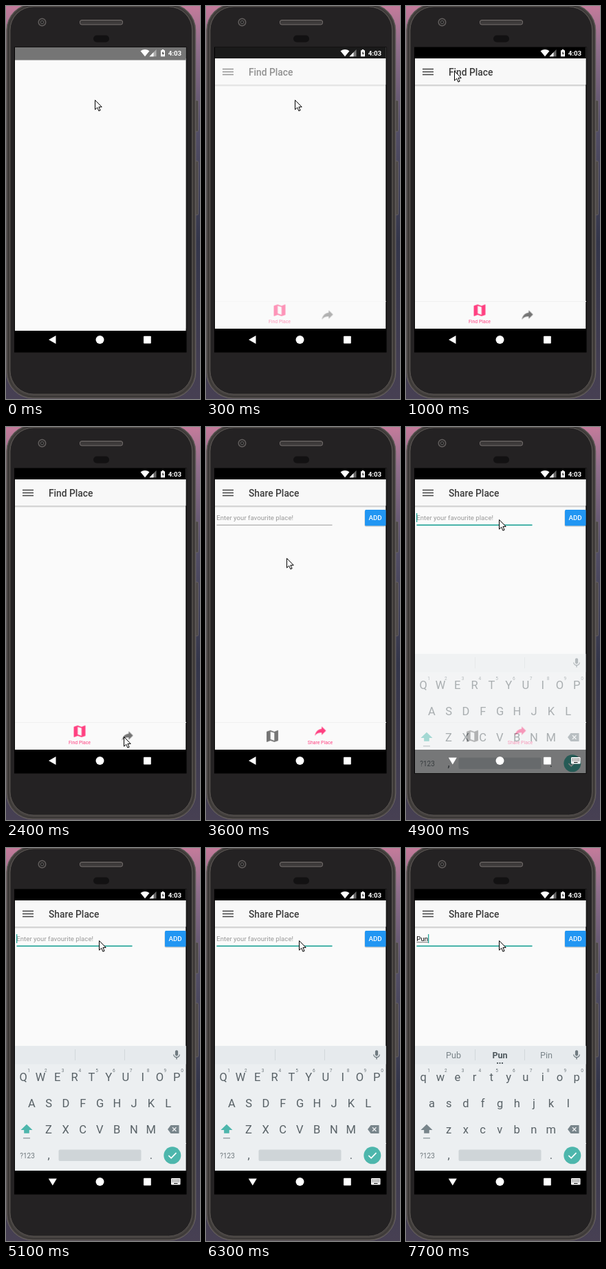
An HTML page for the animation above (8 s loop, 282x570 px).

```html
<!DOCTYPE html>
<html lang="en">
<head>
<meta charset="utf-8">
<title>Share a place</title>
<style>
html, body { margin: 0; width: 100%; height: 100%; overflow: hidden; background: #242223; }
svg { display: block; width: 282px; height: 570px; }
text { font-family: Roboto, sans-serif; }
.mid { text-anchor: middle; }
.title { font-size: 13.8px; font-weight: 500; fill: #3c3c3c; }
.field { font-size: 9.66px; }
.label { font-size: 6.9px; fill: #ff4081; }
.key { font-size: 16.5px; fill: #596267; }
.hint { font-size: 6.5px; fill: #6f787d; }
.word { font-size: 12.6px; fill: #7b858a; }
.word.best { font-weight: 700; fill: #4f595e; }
.teal { fill: #26a69a; }

/* One clock for every part: 1.25% is 100 ms */
.a { animation: 8s step-end infinite; }
#status { animation-name: status; }
#splash { animation-name: splash; }
#app { animation-name: app; }
#find { animation-name: till3000; }
#share { animation-name: from3000; }
.idle { animation-name: till4800; }
.focus { animation-name: from4800; }
#mapTab { animation-name: mapTab; }
#shareTab { animation-name: shareTab; }
#mapLabel { animation-name: fadeOut; }
#shareLabel { animation-name: fadeIn; }
#keyboard { animation-name: keyboard; }
#hint { animation-name: till6800; }
#caret { animation-name: blink; }
#caps { animation-name: till6900; }
#lower { animation-name: from6900; }
#type1 { animation-name: type1; }
#type2 { animation-name: type2; }
#type3 { animation-name: type3; }
#words1 { animation-name: words1; }
#words2 { animation-name: words2; }
#words3 { animation-name: words3; }
#cursor { animation-name: cursor; }

@keyframes status {
  0% { fill: #757575; }
  1.25% { fill: #3a3a3a; }
  3.75% { fill: #1a1a1a; }
  5%, to { fill: #000; }
}
@keyframes splash { 1.25%, to { opacity: 0; } }
@keyframes app { 0% { opacity: 0; } 3.75% { opacity: .55; } 5%, to { opacity: 1; } }
@keyframes till3000 { 37.5%, to { opacity: 0; } }
@keyframes from3000 { 0% { opacity: 0; } 37.5%, to { opacity: 1; } }
@keyframes till4800 { 60%, to { opacity: 0; } }
@keyframes from4800 { 0% { opacity: 0; } 60%, to { opacity: 1; } }
@keyframes till6800 { 85%, to { opacity: 0; } }
@keyframes till6900 { 86.25%, to { opacity: 0; } }
@keyframes from6900 { 0% { opacity: 0; } 86.25%, to { opacity: 1; } }
@keyframes type1 { 0% { opacity: 0; } 85% { opacity: 1; } 91.25%, to { opacity: 0; } }
@keyframes type2 { 0% { opacity: 0; } 91.25% { opacity: 1; } 95%, to { opacity: 0; } }
@keyframes type3 { 0% { opacity: 0; } 95%, to { opacity: 1; } }
@keyframes words1 { 0% { opacity: 0; } 86.25% { opacity: 1; } 92.5%, to { opacity: 0; } }
@keyframes words2 { 0% { opacity: 0; } 92.5% { opacity: 1; } 96.25%, to { opacity: 0; } }
@keyframes words3 { 0% { opacity: 0; } 96.25%, to { opacity: 1; } }
@keyframes blink {
  0% { opacity: 0; }
  60% { opacity: 1; }
  66.25% { opacity: 0; }
  72.5% { opacity: 1; }
  78.75%, to { opacity: 0; }
}
@keyframes fadeOut {
  0% { opacity: 1; }
  35% { opacity: 1; animation-timing-function: steps(3); }
  38.75%, to { opacity: 0; }
}
@keyframes fadeIn {
  0% { opacity: 0; }
  35% { opacity: 0; animation-timing-function: steps(3); }
  38.75%, to { opacity: 1; }
}
@keyframes mapTab {
  0% { transform: translate(107px, 441.3px); fill: #ff4081; }
  35% { transform: translate(107px, 441.3px); fill: #ff4081; animation-timing-function: steps(3); }
  38.75%, to { transform: translate(96.5px, 448.3px); fill: #757575; }
}
@keyframes shareTab {
  0% { transform: translate(176.5px, 448px); fill: #757575; }
  35% { transform: translate(176.5px, 448px); fill: #757575; animation-timing-function: steps(3); }
  38.75%, to { transform: translate(166.3px, 441px); fill: #ff4081; }
}
@keyframes keyboard {
  0% { transform: translateY(70px); opacity: 0; }
  60% { transform: translateY(70px); opacity: .12; }
  61.25% { transform: translateY(42px); opacity: .5; }
  62.5% { transform: translateY(13px); opacity: .85; }
  63.75%, to { transform: none; opacity: 1; }
}
@keyframes cursor {
  0% { transform: translate(129px, 136px); }
  6.25% { transform: translate(129px, 136px); animation-timing-function: steps(3); }
  10% { transform: translate(22px, 95px); animation-timing-function: steps(2); }
  12.5% { transform: translate(70px, 94px); animation-timing-function: steps(4); }
  17.5% { transform: translate(110px, 285px); animation-timing-function: steps(3); }
  21.25% { transform: translate(97px, 297px); }
  22.5% { transform: translate(97px, 297px); animation-timing-function: steps(6); }
  30% { transform: translate(171px, 449px); }
  38.75% { transform: translate(171px, 449px); animation-timing-function: steps(5); }
  45% { transform: translate(117px, 190px); }
  46.25% { transform: translate(117px, 175px); animation-timing-function: steps(5); }
  52.5%, to { transform: translate(135px, 134px); }
}
</style>
</head>
<body>
<svg viewBox="0 0 282 570">
  <defs>
    <linearGradient id="sky" x2="0" y2="1">
      <stop offset="0" stop-color="#c47b9b"/>
      <stop offset=".1" stop-color="#92708d"/>
      <stop offset=".3" stop-color="#555068"/>
      <stop offset=".6" stop-color="#34364a"/>
      <stop offset="1" stop-color="#474053"/>
    </linearGradient>
    <linearGradient id="shade" x2="0" y2="1">
      <stop offset="0" stop-opacity=".26"/>
      <stop offset="1" stop-opacity="0"/>
    </linearGradient>
    <clipPath id="screen"><rect x="13" y="60" width="248.5" height="441.5"/></clipPath>
    <path id="map" d="M20.5 3l-.16.03L15 5.1 9 3 3.36 4.9c-.21.07-.36.25-.36.48V20.5c0 .28.22.5.5.5l.16-.03L9 18.9l6 2.1 5.64-1.9c.21-.07.36-.25.36-.48V3.5c0-.28-.22-.5-.5-.5zM15 19l-6-2.11V5l6 2.11V19z"/>
    <path id="arrow" d="M14 5v4C7 10 4 15 3 20c2.5-3.5 6-5.1 11-5.1V19l7-7z"/>
    <path id="shift" d="M30 400.800l8.500 8.200h-4.700v4.700h-7.600v-4.700h-4.700z"/>
  </defs>

  <!-- Phone -->
  <rect width="282" height="570" fill="url(#sky)"/>
  <rect x="274" y="137" width="5.500" height="45" rx="1.500" fill="#4b4746" stroke="#77716f" stroke-width=".6"/>
  <rect x="274" y="225" width="5.500" height="78" rx="1.500" fill="#4b4746" stroke="#77716f" stroke-width=".6"/>
  <rect x=".8" y="-3" width="275" height="572" rx="38" fill="#464240" stroke="#6d6764"/>
  <rect x="3.500" y="-.5" width="269.500" height="567" rx="36" fill="none" stroke="#343130"/>
  <rect x="6" y="1" width="264.500" height="562" rx="34" fill="#242223" stroke="#625d5a" stroke-width=".8"/>
  <rect x="107.500" y="20.500" width="62" height="6.500" rx="2.500" fill="#3d3a3a" stroke="#77716f"/>
  <circle cx="52.500" cy="23.500" r="5.300" fill="#2c2a2a" stroke="#625e5d" stroke-width="1.400"/>
  <circle cx="52.500" cy="23.500" r="2" fill="#171616" stroke="#777" stroke-width=".8"/>
  <rect x="127" y="42.500" width="23" height="10" rx="5" fill="#121112"/>
  <rect x="12" y="59.500" width="250.500" height="443" fill="#000"/>

  <g clip-path="url(#screen)">
    <rect x="13" y="60" width="248.500" height="408" fill="#fafafa"/>
    <rect id="status" class="a" x="13" y="60" width="248.500" height="16" fill="#000"/>
    <g id="splash" class="a">
      <rect x="13" y="76" width="248.500" height="395" fill="#fafafa"/>
      <rect x="13" y="60" width="248.500" height="18.500" fill="#757575"/>
    </g>

    <g fill="#fff">
      <path d="M195.500 65.300q6.500-4.600 13 0l-6.500 8z"/>
      <path d="M218.500 63v10.200h-10z" opacity=".4"/>
      <path d="M214.500 67v6.200h-6z"/>
      <path d="M225 64.200h1.800v-1.200h2.400v1.200h1.800v9h-6z"/>
      <path d="M228.500 65.500l-2 3.500h1.300v2.800l2-3.700h-1.300z" fill="#333"/>
      <text x="235.800" y="71.600" font-size="9.660" font-weight="700">4:03</text>
    </g>

    <g id="app" class="a">
      <rect x="13" y="114" width="248.500" height="3" fill="url(#shade)"/>
      <rect x="13" y="76" width="248.500" height="38.200" fill="#f8f8f8"/>
      <path d="M24 91.500h16M24 95.500h16M24 99.500h16" stroke="#424242" stroke-width="1.300"/>
      <g id="find" class="a"><text class="title" x="62" y="100.800">Find Place</text></g>

      <g id="share" class="a">
        <text class="title" x="62" y="100.800">Share Place</text>
        <rect class="a idle" x="15.500" y="141.700" width="168" height="1" fill="#9a9a9a"/>
        <rect class="a focus teal" x="15.500" y="141.400" width="168" height="1.700"/>
        <text id="hint" class="a field" x="15.300" y="135" fill="#999">Enter your favourite place!</text>
        <rect id="caret" class="a teal" x="15" y="125" width="1.300" height="13"/>
        <rect x="230.500" y="121" width="31" height="23.500" rx="2" fill="#000" opacity=".2"/>
        <rect x="231" y="120" width="30.500" height="23.300" rx="1.500" fill="#2196f3"/>
        <text class="mid" x="246" y="135.200" font-size="9.660" font-weight="500" fill="#fff">ADD</text>
      </g>
      <g id="typing"></g>

      <path d="M13 428.500h249" stroke="#f0f0f0"/>
      <g id="mapTab" class="a"><use href="#map" transform="scale(.94) translate(-12 -12)"/></g>
      <g id="shareTab" class="a"><use href="#arrow" transform="scale(.9) translate(-12 -12.500)"/></g>
      <text id="mapLabel" class="a label mid" x="107" y="460.300">Find Place</text>
      <text id="shareLabel" class="a label mid" x="166" y="460.300">Share Place</text>
    </g>

    <g id="keyboard" class="a">
      <rect x="13" y="287" width="248.500" height="181" fill="#eceff1"/>
      <rect x="13" y="287" width="248.500" height="26.500" fill="#e6eaed"/>
      <path d="M100.500 292v16M172.500 292v16" stroke="#d2d8db"/>
      <path transform="translate(239.600 291.800) scale(.7)" fill="#6f7a80" d="M12 14c1.660 0 3-1.340 3-3V5c0-1.660-1.340-3-3-3S9 3.340 9 5v6c0 1.660 1.340 3 3 3zm5.300-3c0 3-2.540 5.100-5.300 5.100S6.700 14 6.700 11H5c0 3.410 2.720 6.230 6 6.720V21h2v-3.280c3.280-.48 6-3.300 6-6.720z"/>
      <g id="words"></g>
      <g id="caps" class="a"><use href="#shift" fill="#4db6ac"/></g>
      <g id="lower" class="a">
        <use href="#shift" fill="#78858b"/>
        <path d="M132 312h2M135.500 312h2M139 312h2" stroke="#596267" stroke-width="2"/>
      </g>
      <g id="hints"></g>
      <path d="M25 420.800h10" stroke="#8b969b" stroke-width="1.300"/>
      <path d="M235 408l4.500-6h12v12h-12z" fill="#78858b"/>
      <path d="M242 405.300l5.400 5.400m0-5.400l-5.400 5.400" stroke="#eceff1" stroke-width="1.300"/>
      <text class="mid" x="31" y="449.600" font-size="10" fill="#6f787d">?123</text>
      <text class="key mid" x="62" y="451">,</text>
      <text class="key mid" x="211" y="451">.</text>
      <rect x="76.500" y="437.500" width="120" height="16.500" rx="2" fill="#cfd5d8"/>
      <circle cx="241.800" cy="445.800" r="12.500" fill="#4db6ac"/>
      <path d="M236.300 446l3.800 3.800 7.400-7.600" fill="none" stroke="#fff" stroke-width="1.700"/>
    </g>

    <g fill="#fff">
      <path class="a idle" d="M62 484l10.500-6v12z"/>
      <path class="a focus" d="M61.800 479.500h12l-6 10z"/>
      <circle cx="136.500" cy="484" r="6"/>
      <rect x="200" y="478.800" width="10.800" height="10.800" rx=".8"/>
      <g class="a focus">
        <rect x="240" y="479" width="13.500" height="9.500" rx="1"/>
        <path d="M241.500 481.500h10.500M241.500 484h10.500" stroke="#000" stroke-dasharray="1.300 1"/>
        <path d="M244 486.500h5.500" stroke="#000"/>
      </g>
    </g>
  </g>

  <path id="cursor" class="a" d="M.5.5v13.700l3.200-3 2.200 5 2.200-1-2.200-4.800h4.300z" fill="#fff" stroke="#000"/>
</svg>
<script>
const $ = id => document.getElementById(id);
const add = (id, markup) => $(id).insertAdjacentHTML('beforeend', markup);
const label = (cls, x, y, s) => `<text class="${cls}" x="${x}" y="${y}">${s}</text>`;

const pitch = 24.78;
const rows = [['QWERTYUIOP', 25.2, 338], ['ASDFGHJKL', 37.4, 376], ['ZXCVBNM', 62, 414]];
for (const [letters, x, y] of rows) {
  [...letters].forEach((c, i) => {
    add('caps', label('key mid', x + i * pitch, y, c));
    add('lower', label('key mid', x + i * pitch, y, c.toLowerCase()));
  });
}
[...'1234567890'].forEach((c, i) => add('hints', label('hint mid', 33 + i * pitch, 324.7, c)));

// Typed text with its composing underline and caret
[['P', 6.1], ['Pu', 11.4], ['Pun', 16.7]].forEach(([s, w], i) => add('typing',
  `<g id="type${i + 1}" class="a">${label('field', 15.3, 135, s)}
  <rect x="15.500" y="136.400" width="${w}" height=".8" fill="#555"/>
  <rect class="teal" x="${15.3 + w}" y="125" width="1.300" height="13"/></g>`));

[['Please', 'P', 'Possible'], ['Put', 'Pu', 'Pull'], ['Pub', 'Pun', 'Pin']].forEach((w, i) => add('words',
  `<g id="words${i + 1}" class="a">${label('word mid', 69, 305, w[0])}
  ${label('word best mid', 136.5, 305, w[1])}${label('word mid', 204, 305, w[2])}</g>`));
</script>
</body>
</html>
```
